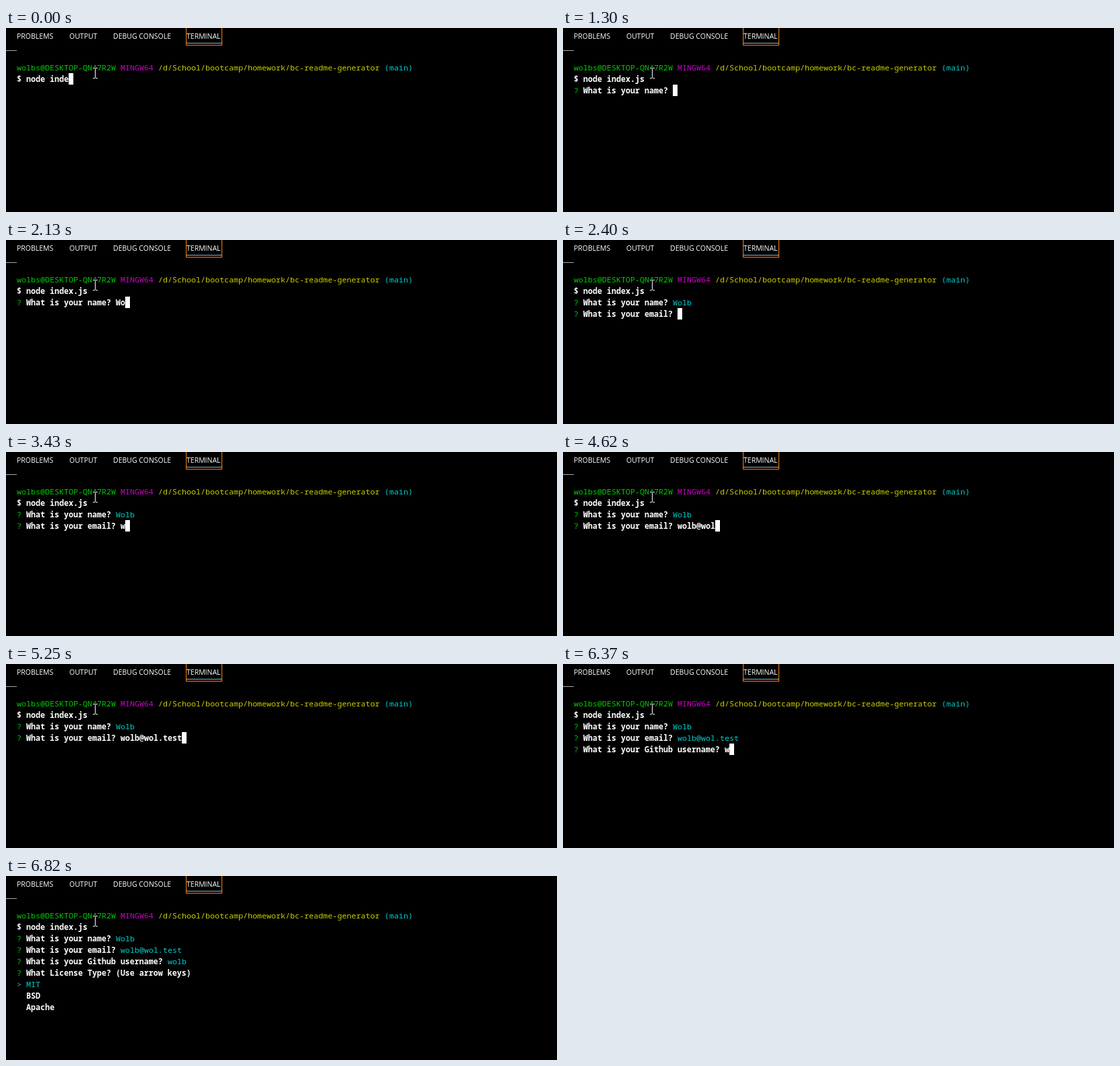
Write an HTML page with a canvas that moves like this. It is 818 px wide and 273 px high and loops after 8000 ms.

```html
<!DOCTYPE html>
<html lang="en">
<head>
<meta charset="utf-8">
<title>Terminal prompt</title>
<style>
  html, body { margin: 0; width: 100%; height: 100%; overflow: hidden; background: #000; }
  canvas { display: block; }
</style>
</head>
<body>
<canvas id="stage" width="818" height="273"></canvas>
<script>
const ctx = document.getElementById('stage').getContext('2d');
const LOOP = 8000;
const CELL = 7, LINE = 17, LEFT = 16, TOP = 50;
const MONO = '11.667px "Noto Sans Mono", "DejaVu Sans Mono", monospace';
const SANS = '500 10.5px "Open Sans", "Noto Sans", sans-serif';
const WHITE = '#fff', GREEN = '#00cd00', CYAN = '#00cdcd';
const MAGENTA = '#cd00cd', YELLOW = '#cdcd00';
const ORANGE = '#f38518', BLUE = '#6fc3df';

// Each question: when it is asked, when it is answered, and [time, typed length] pairs.
const questions = [
  { text: 'What is your name?', reply: 'Wolb', from: 1300, done: 2400,
    keys: [[1950, 1], [2130, 2], [2220, 3], [2310, 4]] },
  { text: 'What is your email?', reply: 'wolb@wol.test', from: 2400, done: 5530,
    keys: [[3430, 1], [3520, 2], [3610, 3], [3700, 4], [4070, 5], [4440, 7],
           [4620, 8], [4710, 9], [4980, 10], [5070, 11], [5160, 12], [5250, 13]] },
  { text: 'What is your Github username?', reply: 'wolb', from: 5530, done: 6820,
    keys: [[6370, 1], [6460, 2], [6550, 3], [6640, 4]] }
];

function rect(x, y, w, h, color) {
  ctx.fillStyle = color;
  ctx.fillRect(x, y, w, h);
}

// Writes [text, color] runs on a terminal row and returns the next column.
// White text is the heavy one.
function write(row, ...runs) {
  let col = 0;
  for (const [text, color] of runs) {
    ctx.font = (color === WHITE ? '700 ' : '500 ') + MONO;
    ctx.fillStyle = color;
    ctx.fillText(text, LEFT + col * CELL, TOP + row * LINE + 13);
    col += text.length;
  }
  return col;
}

function cursor(row, col) {
  rect(LEFT + col * CELL, TOP + row * LINE, CELL, LINE, WHITE);
}

function drawTabs() {
  ctx.font = SANS;
  ctx.fillStyle = WHITE;
  const tabs = [['PROBLEMS', 16], ['OUTPUT', 94], ['DEBUG CONSOLE', 159], ['TERMINAL', 268]];
  for (const [label, x] of tabs) ctx.fillText(label, x, 16);
  rect(267, 0, 1, 26, ORANGE);
  rect(320, 0, 1, 26, ORANGE);
  rect(267, 25, 54, 1, ORANGE);
  rect(268, 22, 52, 1, BLUE);
  rect(0, 33, 16, 1, '#a5a5a5');
}

function drawPointer() {
  rect(128, 58, 3, 3, '#000');
  rect(134, 58, 3, 3, '#000');
  rect(131, 59, 3, 16, '#000');
  for (const y of [59, 74]) {
    rect(129, y, 3, 1, WHITE);
    rect(133, y, 3, 1, WHITE);
  }
  rect(132, 60, 1, 14, WHITE);
}

function drawShell(t) {
  write(0, ['wolbs@DESKTOP-QN47R2W ', GREEN], ['MINGW64 ', MAGENTA],
    ['/d/School/bootcamp/homework/bc-readme-generator ', YELLOW], ['(main)', CYAN]);
  const end = write(1, ['$ node ' + (t < 90 ? 'inde' : 'index.js '), WHITE]);
  if (t < 740) cursor(1, end);
  else if (t < 1300) cursor(2, 0);
}

function drawQuestion(q, row, t) {
  if (t < q.from) return;
  const answered = t >= q.done;
  const typed = q.keys.reduce((n, [at, len]) => t >= at ? len : n, 0);
  const end = write(row, ['? ', GREEN], [q.text + ' ', WHITE],
    [q.reply.slice(0, typed), answered ? CYAN : WHITE]);
  if (!answered) cursor(row, end);
}

function drawList() {
  write(5, ['? ', GREEN], ['What License Type? (Use arrow keys)', WHITE]);
  write(6, ['> MIT', CYAN]);
  write(7, ['  BSD', WHITE]);
  write(8, ['  Apache', WHITE]);
}

function draw(t) {
  rect(0, 0, 818, 273, '#000');
  drawTabs();
  drawShell(t);
  questions.forEach((q, i) => drawQuestion(q, i + 2, t));
  if (t >= 6820) drawList();
  drawPointer();
}

const start = performance.now();
function tick() {
  draw((performance.now() - start) % LOOP);
  requestAnimationFrame(tick);
}
tick();
</script>
</body>
</html>
```
